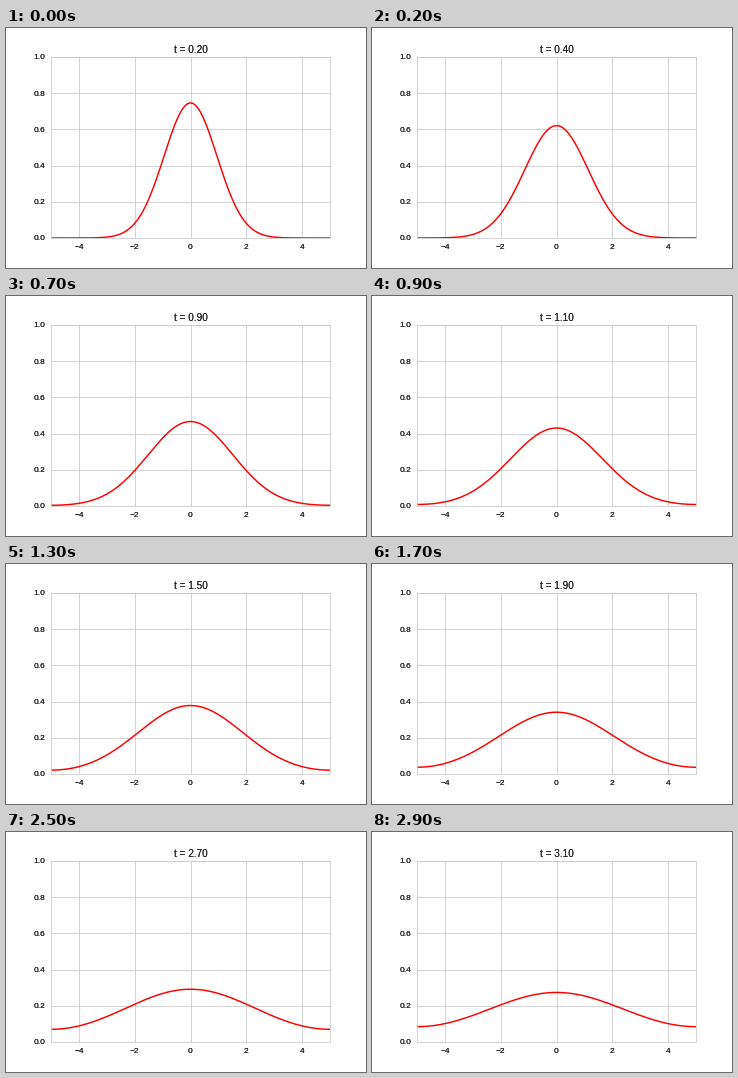
Animation, 360 px wide and 240 px high, one loop 3000 ms. Source, as a matplotlib script:

```python
import numpy as np
import matplotlib.pyplot as plt
from matplotlib.animation import FuncAnimation

FRAMES, INTERVAL = 30, 100
INK, RULE = "0.15", "0.8"

plt.rcParams["font.family"] = "Liberation Sans"


def heat(x, t):
    """Spreading Gaussian, reflected at x = -5 and x = 5."""
    spread = 1 + 4 * t
    return sum(np.exp(-(x - c) ** 2 / spread) for c in (-10, 0, 10)) / np.sqrt(spread)


fig = plt.figure(figsize=(6, 4), dpi=60, facecolor="white")
ax = fig.add_axes([0.125, 0.125, 0.775, 0.755])
ax.set(xlim=(-5, 5), ylim=(0, 1))
ax.set_xticks(range(-4, 5, 2))
ax.set_yticks(np.arange(6) / 5)
ax.set_axisbelow(True)
ax.grid(color=RULE, lw=1)
ax.tick_params(length=0, labelbottom=False, labelleft=False)
for spine in ax.spines.values():
    spine.set(color=RULE, linewidth=1)


def label(text, xy, offset, coords, size, ha, va):
    # Two overlaid copies give the heavy, dark lettering.
    return [ax.annotate(text, xy, offset, xycoords=coords,
                        textcoords="offset points", size=size, color=INK,
                        ha=ha, va=va, annotation_clip=False)
            for _ in range(2)]


for v in ax.get_xticks():
    label(f"{v:.0f}".replace("-", "\u2212"), (v, 0), (0, -7), "data", 10, "center", "top")
for v in ax.get_yticks():
    label(f"{v:.1f}", (0, v), (-7, 0), ("axes fraction", "data"), 10,
          "right", "center_baseline")
title = label("", (0.5, 1), (0, 5), "axes fraction", 12, "center", "baseline")

x = np.linspace(-5, 5, 201)
curve, = ax.plot(x, heat(x, 0.2), color="red", lw=1.75)


def update(i):
    t = 0.2 + 0.1 * i
    curve.set_ydata(heat(x, t))
    for copy in title:
        copy.set_text(f"t = {t:.2f}")
    return [curve, *title]


anim = FuncAnimation(fig, update, frames=FRAMES, interval=INTERVAL,
                     repeat=True, repeat_delay=0, blit=False)
plt.show()
```
